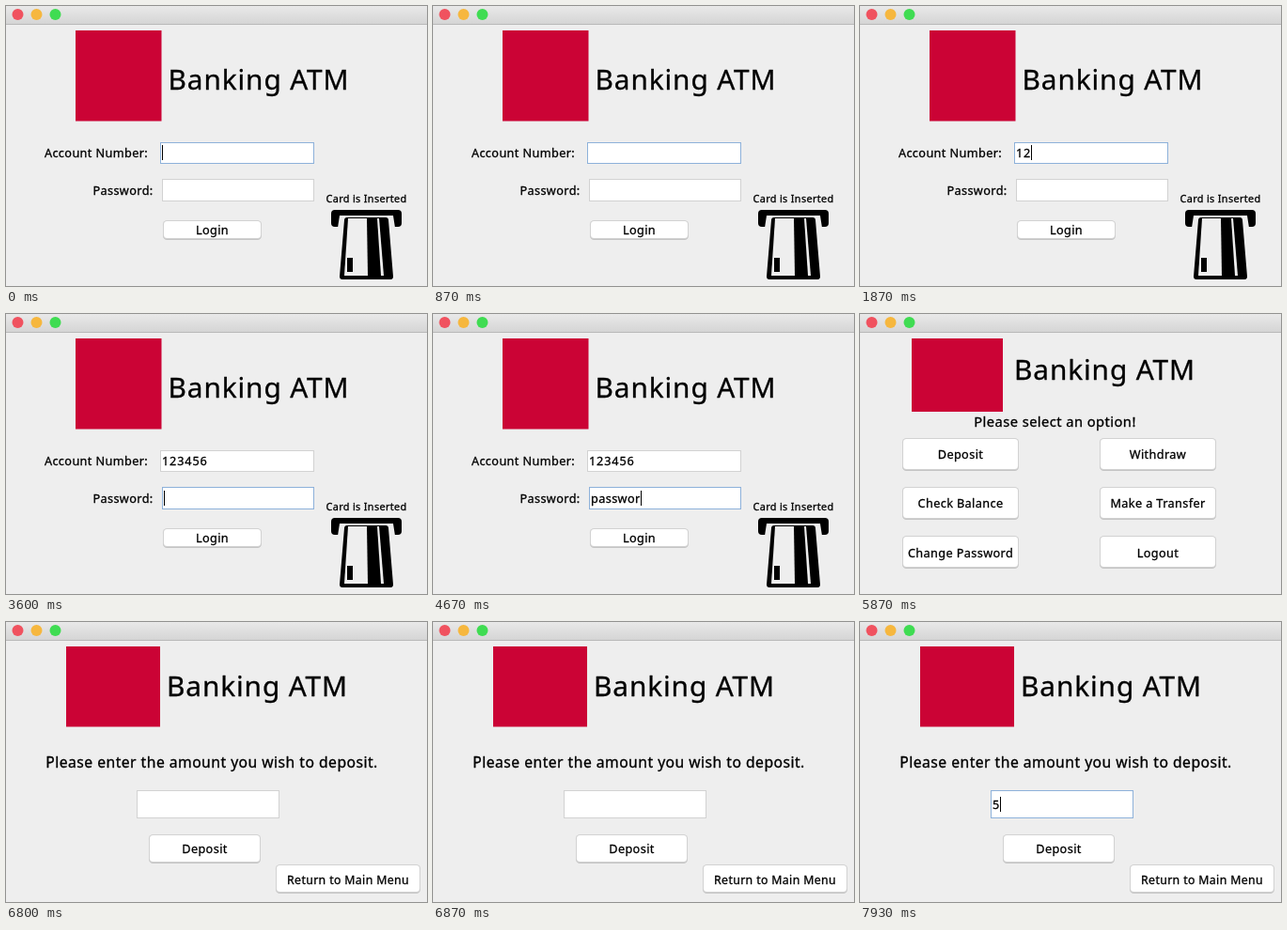
Recreate the animation shown at these times as an HTML page with a canvas. Size 448x298 px, loop 8000 ms.

```html
<!DOCTYPE html>
<html lang="en">
<head>
<meta charset="utf-8">
<title>Banking ATM</title>
<style>
  html, body { margin: 0; overflow: hidden; background: #eee; }
  canvas { display: block; }
</style>
</head>
<body>
<canvas id="stage" width="448" height="298"></canvas>
<script>
const LOOP = 8000;
const PAGE = '#eee';
const ctx = document.getElementById('stage').getContext('2d');

// Moments of clicks and key presses, in ms
const AT = { password: 3330, press: 5270, menu: 5500, pick: 6270, deposit: 6470, amount: 7470 };
const KEYS = {
  account: [1600, 1800, 2270, 2470, 2730, 2930],
  password: [3730, 3870, 4000, 4130, 4270, 4400, 4670, 4930],
  amount: [7870]
};

function rect(x, y, w, h, fill) {
  ctx.fillStyle = fill;
  ctx.fillRect(x, y, w, h);
}

function rounded(x, y, w, h, radius, fill) {
  ctx.fillStyle = fill;
  ctx.beginPath();
  ctx.roundRect(x, y, w, h, radius);
  ctx.fill();
}

// Four-sided shape with level top and bottom; `soft` rounds its corners
function trapezoid(top, left, right, bottom, left2, right2, fill, soft = 0) {
  ctx.fillStyle = ctx.strokeStyle = fill;
  ctx.beginPath();
  ctx.moveTo(left + soft, top + soft);
  ctx.lineTo(right - soft, top + soft);
  ctx.lineTo(right2 - soft, bottom - soft);
  ctx.lineTo(left2 + soft, bottom - soft);
  ctx.closePath();
  ctx.fill();
  if (soft) {
    ctx.lineJoin = 'round';
    ctx.lineWidth = soft * 2;
    ctx.stroke();
  }
}

function shade(y, h, top, bottom) {
  const g = ctx.createLinearGradient(0, y, 0, y + h);
  g.addColorStop(0, top);
  g.addColorStop(1, bottom);
  return g;
}

function text(str, x, y, size = 12.7, align = 'center', spacing = size * 0.03) {
  ctx.font = `${size}px "Noto Sans", "Open Sans", sans-serif`;
  ctx.letterSpacing = spacing + 'px';
  ctx.textAlign = align;
  ctx.fillStyle = ctx.strokeStyle = '#000';
  ctx.lineWidth = 0.3;
  ctx.fillText(str, x, y);
  ctx.strokeText(str, x, y);
  return ctx.measureText(str).width;
}

function button(label, x, y, w, h, { pressed = false, baseline = y + h / 2 + 4.5, size } = {}) {
  rounded(x, y + 1, w, h, 4.5, pressed ? '#2a5fae' : '#c4c4c4');
  rounded(x, y, w, h, 4.5, pressed ? '#3c7fd6' : '#d2d2d2');
  const fill = pressed ? shade(y, h, '#66adf8', '#0b61e4') : '#fff';
  rounded(x + 1, y + 1, w - 2, h - 2, 3.5, fill);
  text(label, x + w / 2, baseline, size);
}

// Text field whose caret restarts its blink on every key press
function field(str, keys, t, focusTime, blurTime, x, y, w, h, baseline, spacing) {
  const focused = t >= focusTime && t < blurTime;
  const typed = keys.filter(k => k <= t);
  rect(x, y, w, h, focused ? '#8db1da' : '#d2d2d2');
  rect(x + 1, y + 1, w - 2, h - 2, '#fff');
  const width = text(str.slice(0, typed.length), x + 2, baseline, 12.7, 'left', spacing);
  const since = t - (typed.length ? typed[typed.length - 1] : focusTime);
  if (focused && since % 1000 < 500) {
    rect(Math.round(x + 2 + width), baseline - 13, 1, 16, '#000');
  }
}

function header(x, w, h, titleX, baseline) {
  rect(x, 26, w, h, '#cb0335');
  text('Banking ATM', titleX, baseline, 29.8);
}

function windowFrame() {
  rect(0, 0, 448, 298, PAGE);
  rect(0, 0, 448, 19, shade(0, 19, '#e9e9e9', '#d5d5d5'));
  rect(0, 19, 448, 1, '#b8b8b8');
  [['#f0525f', 12.5], ['#f6b73e', 32.5], ['#3fdc52', 52.5]]
    .forEach(([fill, x]) => rounded(x - 6, 3, 12, 12, 6, fill));
}

function cardSlot() {
  text('Card is Inserted', 383.5, 209, 10.9);
  rounded(346, 217, 75, 18, 4, '#000');
  trapezoid(223, 355, 412, 236, 353, 414, PAGE);
  trapezoid(225, 360, 407, 291, 355, 412, '#000', 3);
  trapezoid(226, 364, 384, 287, 360, 385, PAGE);
  trapezoid(226, 395, 397, 287, 399, 402, PAGE);
  rect(363, 268, 6, 15, '#000');
}

function loginPage(t) {
  header(74, 91.5, 96.5, 269, 89);
  text('Account Number:', 96, 161);
  field('123456', KEYS.account, t, 0, AT.password, 164, 145, 164, 23, 161, 0.85);
  text('Password:', 124.5, 201);
  field('password', KEYS.password, t, AT.password, AT.press, 166, 184, 162, 24, 201);
  button('Login', 167, 228, 105, 20, { pressed: t >= AT.press, baseline: 243 });
  cardSlot();
}

function menuPage(t) {
  header(55, 97, 78, 260.5, 70);
  text('Please select an option!', 207.5, 120, 14.7);
  const rows = [['Deposit', 'Withdraw'], ['Check Balance', 'Make a Transfer'], ['Change Password', 'Logout']];
  rows.forEach((row, r) => row.forEach((label, c) => {
    const pressed = label === 'Deposit' && t >= AT.pick;
    button(label, 45 + c * 210, 132 + r * 52, 124, 34, { pressed, baseline: 154 + r * 52.3 });
  }));
}

function depositPage(t) {
  header(64, 100, 85.5, 267.5, 79);
  text('Please enter the amount you wish to deposit.', 219, 155, 15.7);
  field('5', KEYS.amount, t, AT.amount, LOOP, 139, 179, 152, 30, 199, 0.85);
  button('Deposit', 152, 226, 119, 30, { baseline: 246 });
  button('Return to Main Menu', 287, 258, 154, 30, { baseline: 279, size: 12.3 });
}

function draw(now) {
  const t = now % LOOP;
  windowFrame();
  (t < AT.menu ? loginPage : t < AT.deposit ? menuPage : depositPage)(t);
  requestAnimationFrame(draw);
}

requestAnimationFrame(draw);
</script>
</body>
</html>
```
